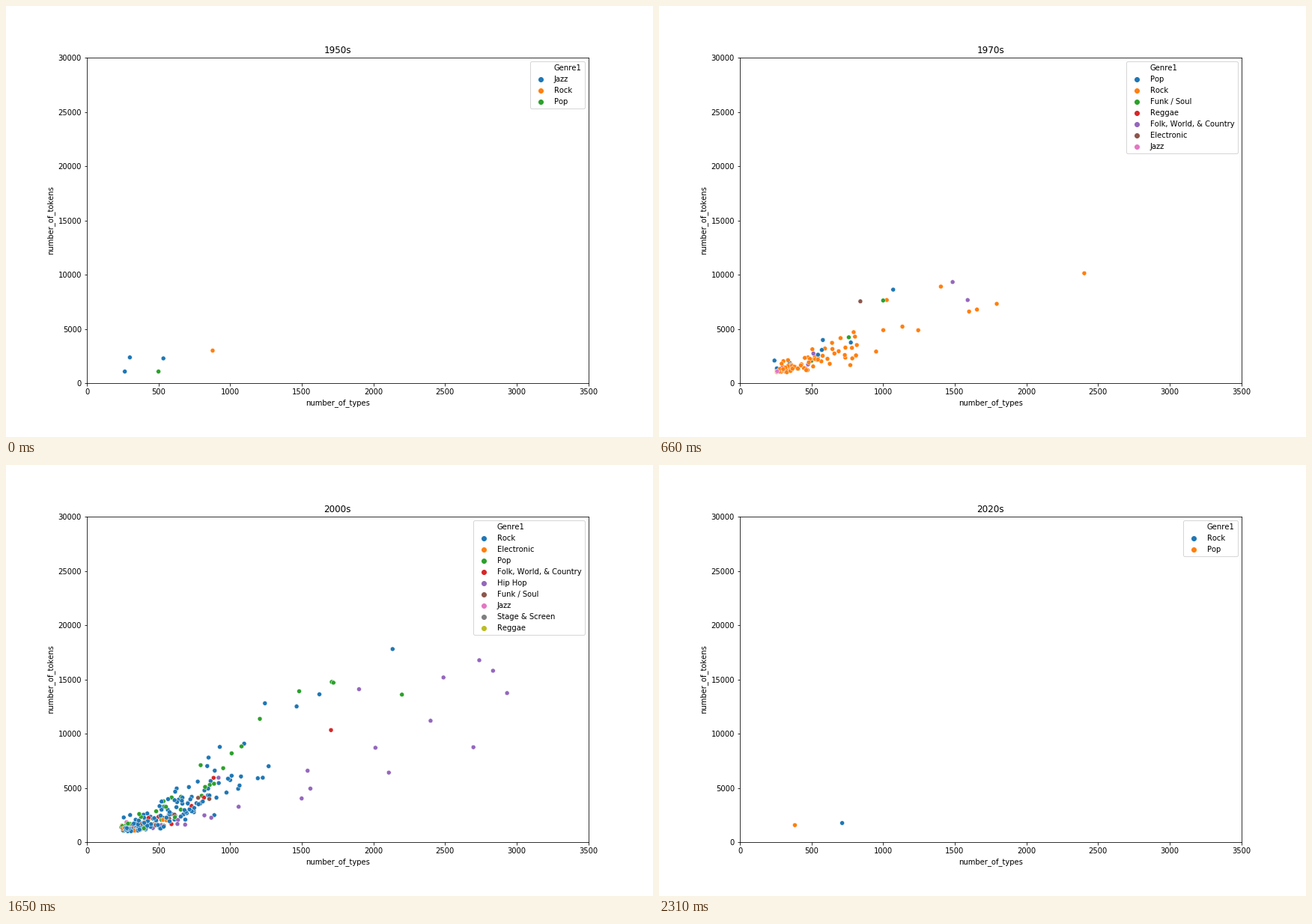
Animation of 864x576 px, one loop 2640 ms. Source, as a matplotlib script:

```python
import matplotlib.pyplot as plt
import numpy as np
from matplotlib.animation import FuncAnimation

W, H, DPI = 864, 576, 72
XMAX, YMAX = 3500, 30000
FOLK, FUNK, HIP = "Folk, World, & Country", "Funk / Soul", "Hip Hop"
COLORS = plt.get_cmap("tab10").colors

# How far a genre's vocabulary reaches, and its tokens relative to the rest
STYLE = {HIP: (2.8, 0.8), FOLK: (1.6, 0.95), "Pop": (1.0, 1.2),
         "Jazz": (0.4, 1.1), "Reggae": (0.4, 1.1)}

plt.rcParams.update({"font.family": "DejaVu Sans", "toolbar": "None",
                     "text.kerning_factor": 6})
fig, ax = plt.subplots(figsize=(W / DPI, H / DPI), dpi=DPI)
fig.subplots_adjust(left=0.125, right=0.9, bottom=0.125, top=0.88)


def album(rng, genre, scale, level, power, spread):
    """Random (types, tokens) along a power law, at least 1000 tokens."""
    reach, ratio = STYLE.get(genre, (1, 1))
    while True:
        types = 240 + rng.exponential(scale * reach)
        tokens = (level * ratio * (types / 500) ** power
                  * np.exp(rng.normal(0, spread)))
        if types < 700 + 600 * reach and tokens > 1000:
            return types, tokens


def decade(year, counts, notable, scale=260, level=2050, power=1.25,
           spread=0.24):
    """Title, genres, points and colours of one scene."""
    rng = np.random.default_rng(year)
    genres = list(counts)
    points, hues = [], []
    for genre, color in zip(genres, COLORS):
        group = notable.get(genre, []) + [
            album(rng, genre, scale, level, power, spread)
            for _ in range(counts[genre])]
        points += group
        hues += [color] * len(group)
    order = rng.permutation(len(points))
    return f"{year}s", genres, np.array(points)[order], np.array(hues)[order]


scenes = [
    decade(1950, {"Jazz": 0, "Rock": 0, "Pop": 0}, {
        "Jazz": [(300, 2370), (265, 1070), (534, 2280)],
        "Rock": [(878, 3000)],
        "Pop": [(500, 1070)],
    }),
    decade(1960, {"Rock": 26, "Jazz": 2, "Pop": 8, FUNK: 4, FOLK: 4}, {},
           scale=200),
    decade(1970, {"Pop": 10, "Rock": 72, FUNK: 4, "Reggae": 2, FOLK: 6,
                  "Electronic": 0, "Jazz": 1}, {
        "Pop": [(1070, 8620)],
        "Rock": [(2404, 10130), (1793, 7310), (1655, 6780), (1600, 6600),
                 (1403, 8900)],
        FUNK: [(1000, 7620)],
        FOLK: [(1485, 9320), (1590, 7660)],
        "Electronic": [(841, 7540)],
    }, power=1.15),
    decade(1980, {"Rock": 90, "Pop": 18, "Electronic": 10, FUNK: 7, FOLK: 5,
                  HIP: 6, "Jazz": 1, "Reggae": 1}, {}, power=1.2),
    decade(1990, {"Rock": 130, "Electronic": 9, FOLK: 7, "Pop": 18, FUNK: 7,
                  HIP: 12, "Jazz": 1, "Reggae": 1}, {
        "Rock": [(1964, 11220), (2317, 10800), (1809, 9560), (2201, 7420)],
        "Electronic": [(1822, 10000), (30, 1040)],
        FOLK: [(2369, 11060)],
        "Pop": [(199, 1100)],
        HIP: [(2789, 13750), (2914, 13200), (2838, 8790), (1984, 8020)],
    }),
    decade(2000, {"Rock": 145, "Electronic": 10, "Pop": 30, FOLK: 8, HIP: 18,
                  FUNK: 8, "Jazz": 1, "Stage & Screen": 1, "Reggae": 1}, {
        "Rock": [(2134, 17800), (1623, 13630), (1464, 12510)],
        "Pop": [(1709, 14770), (1721, 14700), (1482, 13910), (2199, 13600)],
        FOLK: [(1704, 10330)],
        HIP: [(2739, 16770), (2835, 15800), (2489, 15180), (2933, 13740),
              (2698, 8750), (2399, 11190)],
    }, scale=290, level=2150, power=1.3, spread=0.27),
    decade(2010, {"Rock": 80, "Electronic": 6, "Pop": 42, FOLK: 8, HIP: 14,
                  FUNK: 3, "Jazz": 1, "Reggae": 2}, {
        "Rock": [(3257, 30050), (1328, 17500), (1136, 13240), (1526, 11550)],
        "Pop": [(2404, 23210), (1579, 17710), (1550, 13560)],
        HIP: [(2927, 16470), (3089, 15110), (2404, 14660), (1710, 12420)],
        "Jazz": [(2148, 12620)],
    }, scale=300, level=2250, power=1.4, spread=0.3),
    decade(2020, {"Rock": 0, "Pop": 0}, {
        "Rock": [(714, 1760)],
        "Pop": [(384, 1570)],
    }),
]


def draw(i):
    title, genres, points, hues = scenes[i]
    ax.clear()
    ax.scatter(*points.T, c=hues, s=36, edgecolors="white", linewidths=0.48)
    ax.scatter([], [], alpha=0, label="Genre1")
    for genre, color in zip(genres, COLORS):
        ax.scatter([], [], color=[color], label=genre)
    ax.set(xlim=(0, XMAX), ylim=(0, YMAX), title=title,
           xlabel="number_of_types", ylabel="number_of_tokens")
    ax.legend(loc="upper right")
    return []


anim = FuncAnimation(fig, draw, frames=len(scenes), init_func=lambda: [],
                     interval=330, repeat=True, repeat_delay=0)
plt.show()
```
